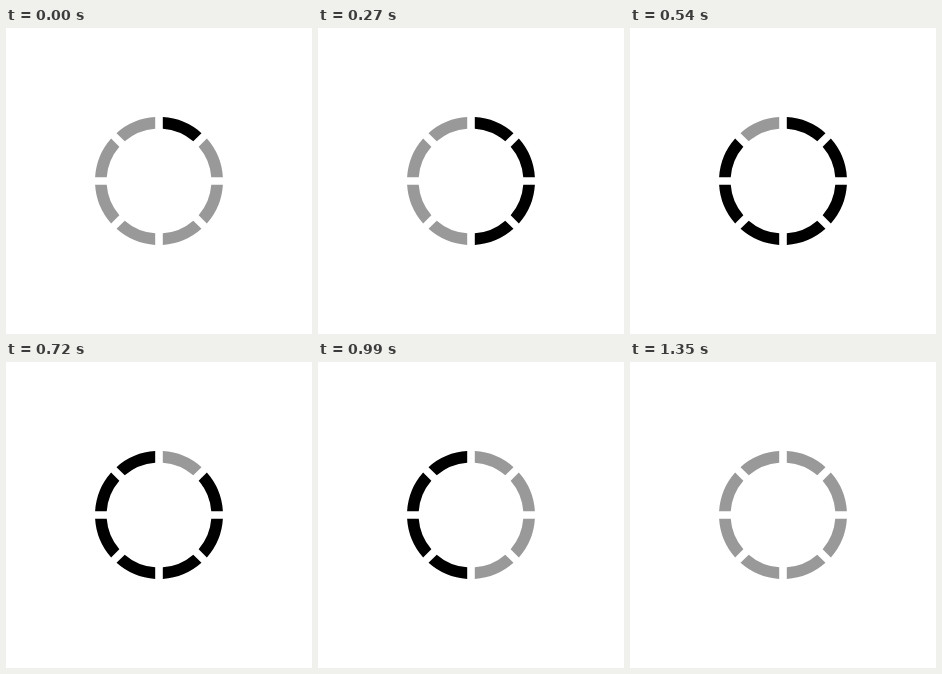
Animation, 306 px wide and 306 px high, one loop 1.44 s. Source, as an HTML page:

```html
<!DOCTYPE html>
<html lang="en">
<head>
<meta charset="utf-8">
<title>Ring loader</title>
<style>
  html, body { margin: 0; width: 100%; height: 100%; overflow: hidden; background: #fff; }
  svg { display: block; width: 100%; height: 100%; }

  /* Each segment is black for half the loop, 90 ms after its neighbour. */
  use {
    fill: #999;
    transform: rotate(calc(var(--i) * 45deg));
    animation: blink 1440ms step-end calc(var(--i) * 90ms - 1440ms) infinite;
  }
  @keyframes blink {
    0% { fill: #000; }
    50%, 100% { fill: #999; }
  }
</style>
</head>
<body>
<svg viewBox="-153 -153 306 306">
  <defs>
    <path id="seg" d="M3.8-63.89A64 64 0 0 1 42.49-47.87L34.26-39.64A52.4 52.4 0 0 0 3.8-52.26Z"/>
  </defs>
  <use href="#seg" style="--i:0"/>
  <use href="#seg" style="--i:1"/>
  <use href="#seg" style="--i:2"/>
  <use href="#seg" style="--i:3"/>
  <use href="#seg" style="--i:4"/>
  <use href="#seg" style="--i:5"/>
  <use href="#seg" style="--i:6"/>
  <use href="#seg" style="--i:7"/>
</svg>
</body>
</html>
```
